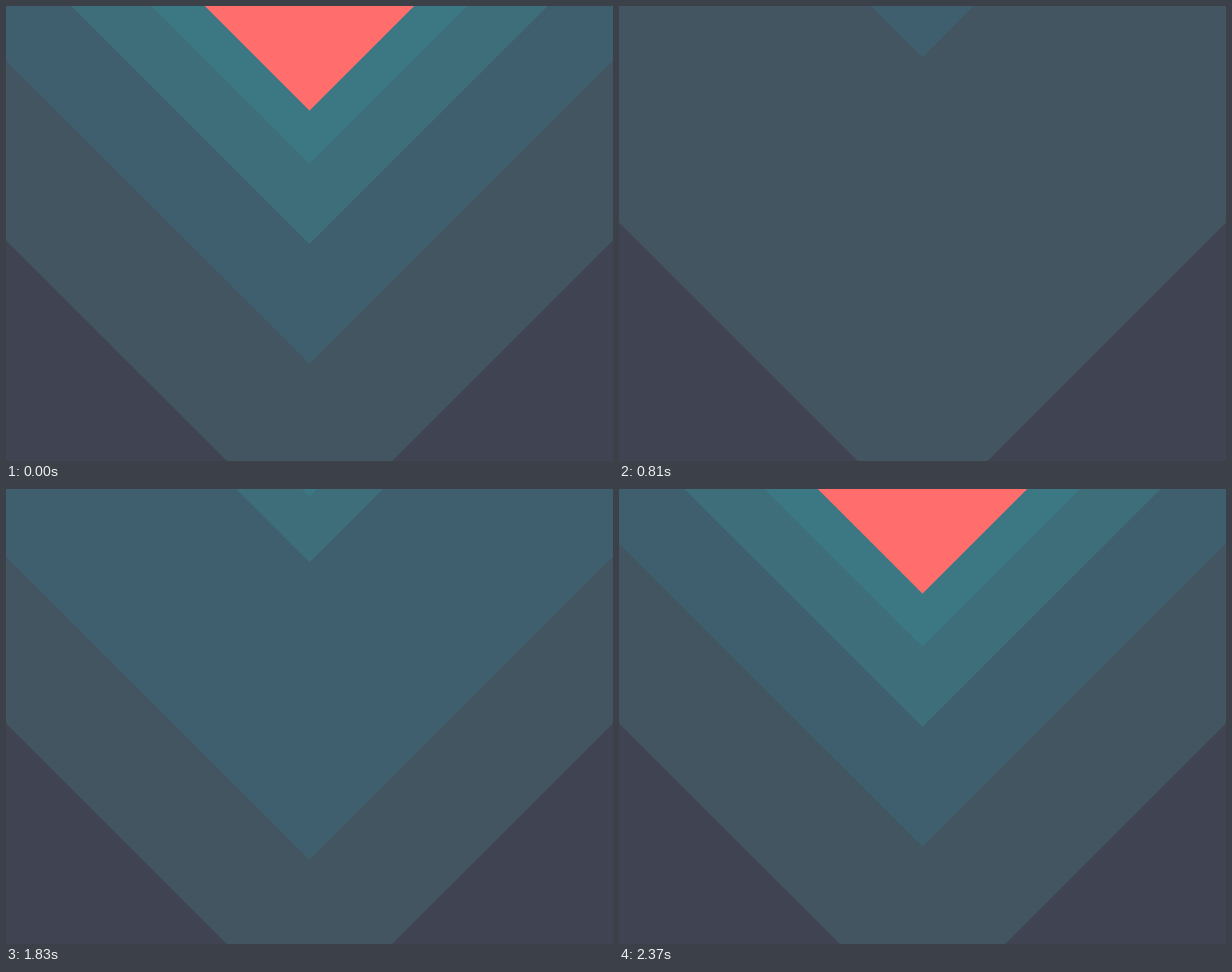
Recreate the animation shown at these times as an HTML page with a canvas. Size 800 px wide and 600 px high, loop 2.4 s.

```html
<!DOCTYPE html>
<html lang="en">
<head>
<meta charset="utf-8">
<title>Chevrons</title>
<style>
  html, body { margin: 0; width: 100%; height: 100%; overflow: hidden; background: #404452; }
  canvas { display: block; width: 100vw; height: 100vh; }
</style>
</head>
<body>
<canvas id="stage" width="800" height="600"></canvas>
<script>
const ctx = document.getElementById('stage').getContext('2d');
const LOOP = 2400, STEP = 30, DURATION = 516;

// Back to front: half diagonal, colour, start of shrinking, start of growing
const layers = [
  { size: 709, color: '#435560', out: 576, in: 1270 },
  { size: 472, color: '#3f5e6e', out: 432, in: 1402 },
  { size: 314, color: '#3e6e7a', out: 288, in: 1580 },
  { size: 208, color: '#3b7884', out: 144, in: 1735 },
  { size: 138, color: '#ff6e6c', out: 0, in: 1842 }
];

// Strong anticipation at the start, equal overshoot at the end
function backInOut(x) {
  if (x <= 0) return 0;
  if (x >= 1) return 1;
  if (x > 0.5) return 1 - backInOut(1 - x);
  const p = 2 * x, pull = 8.7;
  return 0.5 * p ** 4 * ((pull + 1) * p - pull);
}

function scaleAt(layer, t) {
  return t < layer.in
    ? 1 - backInOut((t - layer.out) / DURATION)
    : backInOut((t - layer.in) / DURATION);
}

function draw(t) {
  ctx.fillStyle = '#404452';
  ctx.fillRect(0, 0, 800, 600);
  for (const layer of layers) {
    // A mirrored diamond looks the same, so only the magnitude matters
    const r = Math.abs(layer.size * scaleAt(layer, t));
    ctx.fillStyle = layer.color;
    ctx.beginPath();
    ctx.moveTo(400 - r, 0);
    ctx.lineTo(400 + r, 0);
    ctx.lineTo(400, r);
    ctx.fill();
  }
}

const start = performance.now();
function tick() {
  const t = (performance.now() - start) % LOOP;
  draw(Math.floor(t / STEP) * STEP);
  requestAnimationFrame(tick);
}
tick();
</script>
</body>
</html>
```
